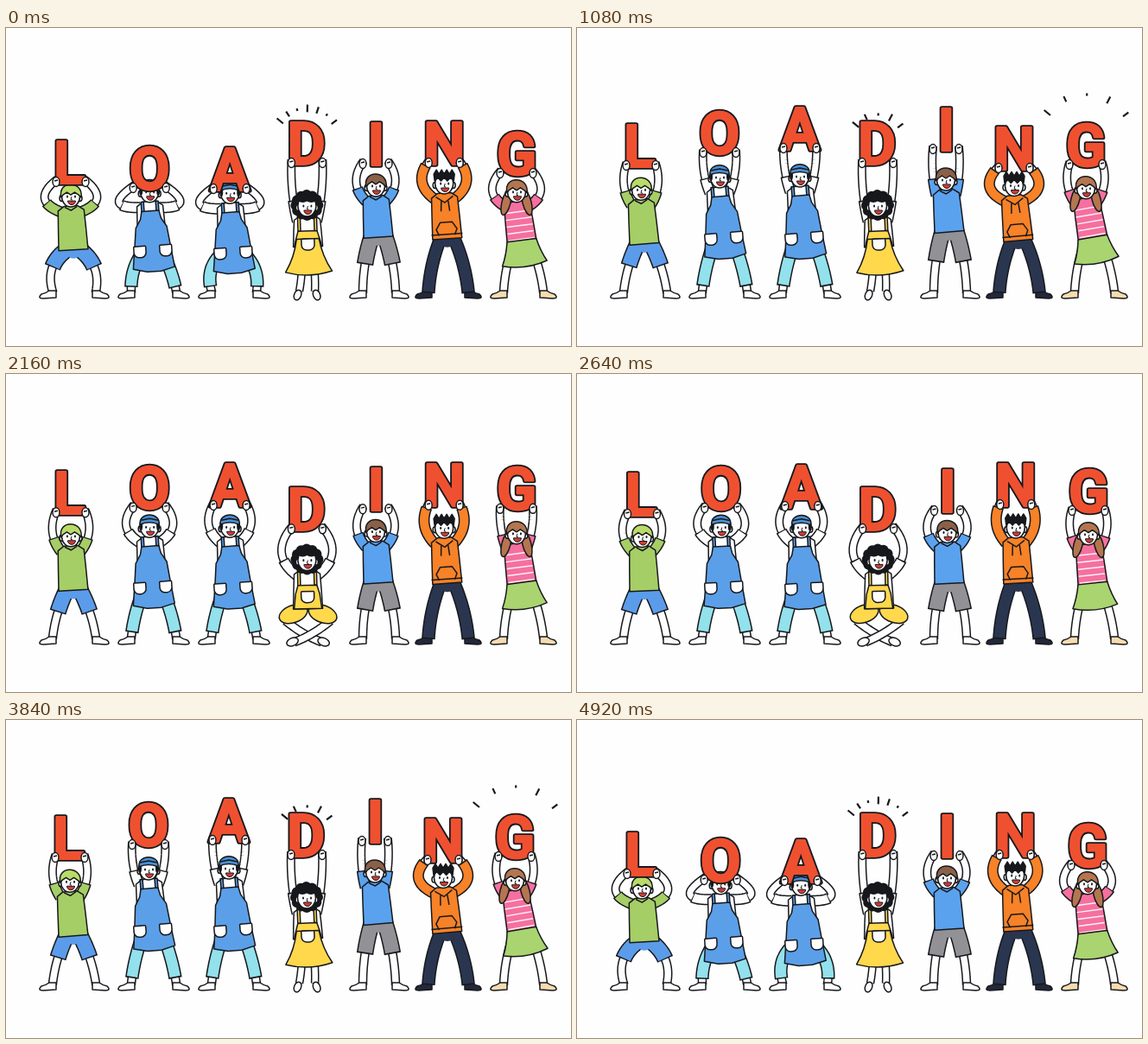
These frames come from a looping animation (654x368 px, 5.04 s). An HTML page with a canvas:

```html
<!DOCTYPE html>
<html lang="en">
<head>
<meta charset="utf-8">
<title>Loading</title>
<style>
html, body { margin: 0; width: 100%; height: 100%; overflow: hidden; background: #fefefe; }
canvas { display: block; }
</style>
</head>
<body>
<canvas id="stage" width="654" height="368"></canvas>
<script>
const c = document.getElementById('stage').getContext('2d');
const INK = '#17181c', RED = '#ef5130', WHITE = '#fefefe', BLUE = '#5b9fe8', YELLOW = '#ffd84c';
const STEP = 120, STEPS = 42, LINE = 1.5, LEG = 27, FLOOR = 313;

// Key poses: step, and how far everyone sways sideways
const KEYS = [0, 9, 15, 19], SWAY = [0.2, 0, -0.4, 0.3];

// x, y: letter at its highest; head, hip: heights there; drops: how far it sinks at each key
const worker = {
  lean: 6, stance: 41, hip: 240, grip: 19, hair: 'cap', hairColor: '#4a8fd2',
  top: WHITE, pants: '#92e1ec', pantsTo: 0.88, outfit: 'apron'
};
const figures = [
  { ch: 'L', x: 74, y: 128, head: 184, hip: 247, lean: 5, stance: 40, drops: [27, 8, 0, 11], grip: 17,
    hair: 'fringe', hairColor: '#b9db68', top: '#a6ce66', pants: '#5b9cea', pantsTo: 0.45 },
  { ...worker, ch: 'O', x: 165, y: 121, head: 173, drops: [41, 0, 7, 11] },
  { ...worker, ch: 'A', x: 258, y: 116, head: 172, drops: [47, 0, 7, 14] },
  { ch: 'D', x: 348, y: 133, head: 206, hip: 253, lean: 2, drops: [0, 0, 25, 23], grip: 18, arm: 32,
    hair: 'curls', hairColor: INK, top: WHITE, outfit: 'pinafore' },
  { ch: 'I', x: 427, y: 117, head: 176, hip: 236, lean: 5, stance: 34, drops: [17, 0, 6, 18], grip: 15,
    hair: 'fringe', hairColor: '#8a6148', top: '#5ba2ee', pants: '#929296', pantsTo: 0.48 },
  { ch: 'N', x: 506, y: 128, head: 178, hip: 242, lean: 6, stance: 38, drops: [5, 11, 5, 0], grip: 18,
    hair: 'spikes', hairColor: INK, top: '#f78227', sleeve: 0.88, pants: '#2a3650', pantsTo: 1, shoe: '#22283a', outfit: 'hoodie' },
  { ch: 'G', x: 589, y: 121, head: 180, hip: 238, lean: 10, stance: 38, drops: [24, 14, 0, 14], grip: 19,
    hair: 'long', hairColor: '#b4764f', top: '#f5709f', shoe: '#f6dcb0', outfit: 'skirt' }
];

// Fans of short strokes that open out around a letter
const bursts = [
  { x: 348, y: 133, r: 40, rays: 7, from: 0, to: 3, peak: 0 },
  { x: 348, y: 133, r: 33, rays: 5, from: 8, to: 10, peak: 9 },
  { x: 589, y: 135, r: 58, rays: 5, from: 7, to: 10, peak: 9 },
  { x: 587, y: 121, r: 36, rays: 7, from: 13, to: 17, peak: 15 }
];

const mix = (a, b, t) => a + (b - a) * t;
const mirror = half => [...half, ...half.map(([x, y]) => [-x, y]).reverse()];

function finish(fill) {
  if (fill) { c.fillStyle = fill; c.fill(); }
  c.stroke();
}

function line(...pts) {
  c.beginPath();
  pts.forEach(([x, y]) => c.lineTo(x, y));
  c.stroke();
}

function shape(fill, pts) {
  c.beginPath();
  pts.forEach(([x, y]) => c.lineTo(x, y));
  c.closePath();
  finish(fill);
}

function oval(x, y, rx, ry, fill, outline = true, turn = 0) {
  c.beginPath();
  c.ellipse(x, y, rx, ry, turn, 0, 7);
  c.fillStyle = fill;
  c.fill();
  if (outline) c.stroke();
}

// Joint between a and b, with equal bones, bent toward side s
function joint(a, b, len, s) {
  const dx = b[0] - a[0], dy = b[1] - a[1], d = Math.hypot(dx, dy) || 1;
  const off = s * Math.sqrt(Math.max(6, len * len - d * d / 4)) * Math.sign(dy);
  return [(a[0] + b[0]) / 2 + off * dy / d, (a[1] + b[1]) / 2 - off * dx / d];
}

// Tube from a through e to b, drawn up to the share given by end
function limb(a, e, b, w, fill, end = 1) {
  const at = (t, i) => a[i] * (1 - t) ** 2 + (4 * e[i] - a[i] - b[i]) * t * (1 - t) + b[i] * t * t;
  const trace = (last, width, color) => {
    c.beginPath();
    for (let i = 0; i <= 14; i++) c.lineTo(at(last * i / 14, 0), at(last * i / 14, 1));
    c.lineWidth = width;
    c.strokeStyle = color;
    c.stroke();
  };
  trace(end + 0.025, w + LINE, INK);
  trace(end, w - LINE, fill);
  c.lineWidth = LINE;
  c.strokeStyle = INK;
}

function foot(x, s, fill) {
  c.beginPath();
  c.moveTo(x - s * 4, FLOOR - 1);
  c.lineTo(x - s * 4, FLOOR - 9);
  c.lineTo(x + s * 4, FLOOR - 9);
  c.quadraticCurveTo(x + s * 8, FLOOR - 6, x + s * 13, FLOOR - 5);
  c.quadraticCurveTo(x + s * 18, FLOOR, x + s * 11, FLOOR);
  c.closePath();
  finish(fill);
}

function legs(f, [x, y]) {
  for (const s of [-1, 1]) {
    const a = [x + s * 8, y], b = [f.x + f.lean + s * (f.stance - 15), FLOOR - 8];
    const knee = joint(a, b, LEG, s);
    limb(a, knee, b, 9, WHITE);
    foot(b[0], s, f.shoe || WHITE);
    if (f.pants) limb(a, knee, b, f.pantsTo < 0.6 ? 18 : 14, f.pants, f.pantsTo);
  }
  if (f.pants) oval(x, y + 3, 8, 7, f.pants, false);
}

function girlLegs([x, y], sitting) {
  for (const s of [-1, 1]) {
    if (sitting) {
      const knee = [x + s * 26, y + 14], end = [x - s * 15, FLOOR - 3];
      limb(knee, [x + s * 6, y + 28], end, 9, WHITE);
      oval(end[0] - s * 3, end[1], 7, 4.5, WHITE, true, -s * 0.4);
    } else {
      const end = [x - 1 + s * 9, FLOOR - 9];
      limb([x + s * 7, y + 22], [x + s * 8, y + 37], end, 8, WHITE);
      oval(end[0] + s * 2, end[1] + 5, 4, 6, WHITE, true, -s * 0.4);
    }
  }
  if (sitting) for (const s of [-1, 1]) oval(x + s * 17, y + 6, 17, 10, YELLOW, true, s * 0.35);
}

function pocket(x, y, w) {
  c.beginPath();
  c.roundRect(x - w / 2, y, w, 13, [1, 1, 6, 6]);
  finish(WHITE);
}

// Skirt flaring from half-width w at y0 to half-width w2 at y1
function flare(fill, w, y0, w2, y1) {
  c.beginPath();
  c.moveTo(-w, y0);
  c.lineTo(w, y0);
  c.quadraticCurveTo(w + 3, mix(y0, y1, 0.5), w2, y1 - 3);
  c.quadraticCurveTo(0, y1 + 5, -w2, y1 - 3);
  c.quadraticCurveTo(-w - 3, mix(y0, y1, 0.5), -w, y0);
  finish(fill);
}

function straps(fill, x) {
  for (const s of [-1, 1]) shape(fill, [[s * x, 0], [s * (x + 3), 0], [s * (x + 3), 18], [s * x, 18]]);
}

// Clothes in a frame with the neck at 0,0 and the hip at 0,h
const outfits = {
  apron(h) {
    straps(BLUE, 7);
    shape(BLUE, mirror([[10, 11], [12, 20], [18, 30], [21, h], [24, h + 23], [8, h + 27]]));
    pocket(-15, h - 3, 14);
    pocket(15, h - 3, 14);
  },
  pinafore(h, sitting) {
    straps(YELLOW, 8);
    shape(YELLOW, mirror([[11, 18], [14, 28], [16, h]]));
    if (!sitting) flare(YELLOW, 13, 27, 27, h + 32);
    pocket(0, sitting ? h - 20 : h - 9, 15);
  },
  hoodie(h) {
    line([-9, h - 4], [-12, h - 11], [-7, h - 19], [7, h - 19], [12, h - 11], [9, h - 4]);
    line([-18, h - 5], [18, h - 5]);
    line([-10, 4], [0, 11], [10, 4]);
    for (const s of [-1, 1]) line([s * 4, 9], [s * 5, 21]);
  },
  skirt(h) {
    c.strokeStyle = '#fff0f4';
    for (let y = 12; y < h - 2; y += 8) line([-15, y], [15, y]);
    c.strokeStyle = INK;
    flare('#a9d470', 17, h - 1, 26, h + 29);
  }
};

function torso(f, h, sitting) {
  shape(f.top, mirror([[8, 0], [15, 5], [16, h / 2], [17, h]]));
  if (f.outfit) outfits[f.outfit](h, sitting);
  else line([-7, 1], [0, 5], [7, 1]);
}

// Zigzag edge from x = -w to w, swinging between heights y and y - size
function zigzag(w, y, size, n) {
  return Array.from({ length: n + 1 }, (_, i) => [mix(-w, w, i / n), y - (i % 2) * size]);
}

function backHair(f) {
  if (f.hair === 'curls') {
    for (let a = 0; a < 6.2; a += 0.52) oval(Math.cos(a) * 13, Math.sin(a) * 12 - 1, 6, 6, INK, false);
    oval(0, -3, 15, 14, INK, false);
  }
  if (f.hair === 'long')
    for (const s of [-1, 1]) oval(s * 12, 12, 5, 15, f.hairColor, true, -s * 0.25);
}

function frontHair(f) {
  const color = f.hairColor;
  if (f.hair === 'cap') {
    for (const s of [-1, 1]) oval(s * 10, -1, 2, 5, INK, false);
    c.beginPath();
    c.moveTo(-11, -3);
    c.bezierCurveTo(-13, -18, 13, -18, 11, -3);
    c.quadraticCurveTo(0, -8, -11, -3);
    finish(color);
    line([-10, -8], [0, -10], [10, -8]);
  } else if (f.hair === 'spikes') {
    shape(color, [...zigzag(12, -11, 5, 8), ...zigzag(-11, -3, 4, 6)]);
  } else if (f.hair === 'curls') {
    for (const s of [-1, 1]) oval(s * 5, -9, 7, 5, color, false);
  } else {
    c.beginPath();
    c.moveTo(-11, 1);
    c.bezierCurveTo(-16, -19, 15, -19, 12, 1);
    zigzag(-9, -2, 3, 4).forEach(([x, y]) => c.lineTo(x, y));
    c.closePath();
    finish(color);
  }
}

function head(f, x, y) {
  c.save();
  c.translate(x, y);
  backHair(f);
  for (const s of [-1, 1]) oval(s * 10.5, 2, 2.5, 3.5, WHITE);
  oval(0, 0, 10.5, 12, WHITE);
  frontHair(f);
  for (const ex of [-4, 5]) oval(ex, 0, 1, 1.6, INK, false);
  c.lineWidth = 1;
  line([1, 0], [0, 3.5], [2, 4]);
  c.beginPath();
  c.arc(1, 5, 4.5, 0, Math.PI);
  c.closePath();
  finish('#d33b36');
  c.restore();
}

function letter(ch, x, y) {
  c.font = 'bold 68px Roboto, Arial, sans-serif';
  const m = c.measureText(ch);
  const left = x - (m.actualBoundingBoxRight - m.actualBoundingBoxLeft) / 2;
  const base = y + (m.actualBoundingBoxAscent - m.actualBoundingBoxDescent) / 2;
  c.lineWidth = 5.6;
  c.strokeText(ch, left, base);
  c.lineWidth = 2;
  c.strokeStyle = c.fillStyle = RED;
  c.strokeText(ch, left, base);
  c.fillText(ch, left, base);
  c.lineWidth = LINE;
  c.strokeStyle = INK;
}

function figure(f, p) {
  const i = p <= KEYS[1] ? 0 : p <= KEYS[2] ? 1 : 2;
  const t = Math.min(1, (p - KEYS[i]) / (KEYS[i + 1] - KEYS[i])), e = t * t * (3 - 2 * t);
  const drop = mix(f.drops[i], f.drops[i + 1], e);
  const x = f.x + f.lean * mix(SWAY[i], SWAY[i + 1], e), y = f.y + drop;
  const sitting = !f.stance && p >= 12;
  const neck = [x, f.head + drop * 0.41 + 11];
  const hip = [f.x + f.lean * 0.8, f.hip + drop * (f.stance ? 0.36 : 0.8)];
  const dx = hip[0] - neck[0], dy = hip[1] - neck[1];

  if (f.stance) legs(f, hip);
  else girlLegs(hip, sitting);

  const hands = [-1, 1].map(s => [x + s * f.grip, y + 21]);
  hands.forEach((b, j) => {
    const s = j * 2 - 1, a = [neck[0] + s * 11, neck[1] + 7], elbow = joint(a, b, f.arm || 25, s);
    limb(a, elbow, b, 8.5, WHITE);
    limb(a, elbow, b, 11.5, f.top, f.sleeve || 0.33);
  });

  c.save();
  c.translate(...neck);
  c.rotate(-Math.atan2(dx, dy));
  torso(f, Math.hypot(dx, dy), sitting);
  c.restore();

  head(f, neck[0], neck[1] - 11);
  letter(f.ch, x, y);
  for (const [hx, hy] of hands) {
    oval(hx, hy + 2, 4, 5.5, WHITE);
    line([hx - 2, hy + 1], [hx + 2, hy]);
  }
}

function sparks(p) {
  c.lineWidth = 2.2;
  for (const b of bursts) {
    if (p < b.from || p > b.to) continue;
    const grow = 1 + 0.13 * (p - b.peak);
    for (let i = 0; i < b.rays; i++) {
      const a = mix(-2.45, -0.65, i / (b.rays - 1)), half = 3.2 + 1.8 * Math.sin(i * 2 + 1);
      const at = r => [b.x + Math.cos(a) * r * grow, b.y + Math.sin(a) * r * grow];
      line(at(b.r - half), at(b.r + half));
    }
  }
}

function draw(now) {
  const n = Math.floor(now / STEP) % STEPS;
  const p = Math.min(n, STEPS - 1 - n);
  c.fillStyle = WHITE;
  c.fillRect(0, 0, 654, 368);
  c.lineJoin = 'round';
  c.lineWidth = LINE;
  c.strokeStyle = INK;
  figures.forEach(f => figure(f, p));
  sparks(p);
}

const start = performance.now();
function loop() {
  draw(performance.now() - start);
  requestAnimationFrame(loop);
}
loop();
</script>
</body>
</html>
```
